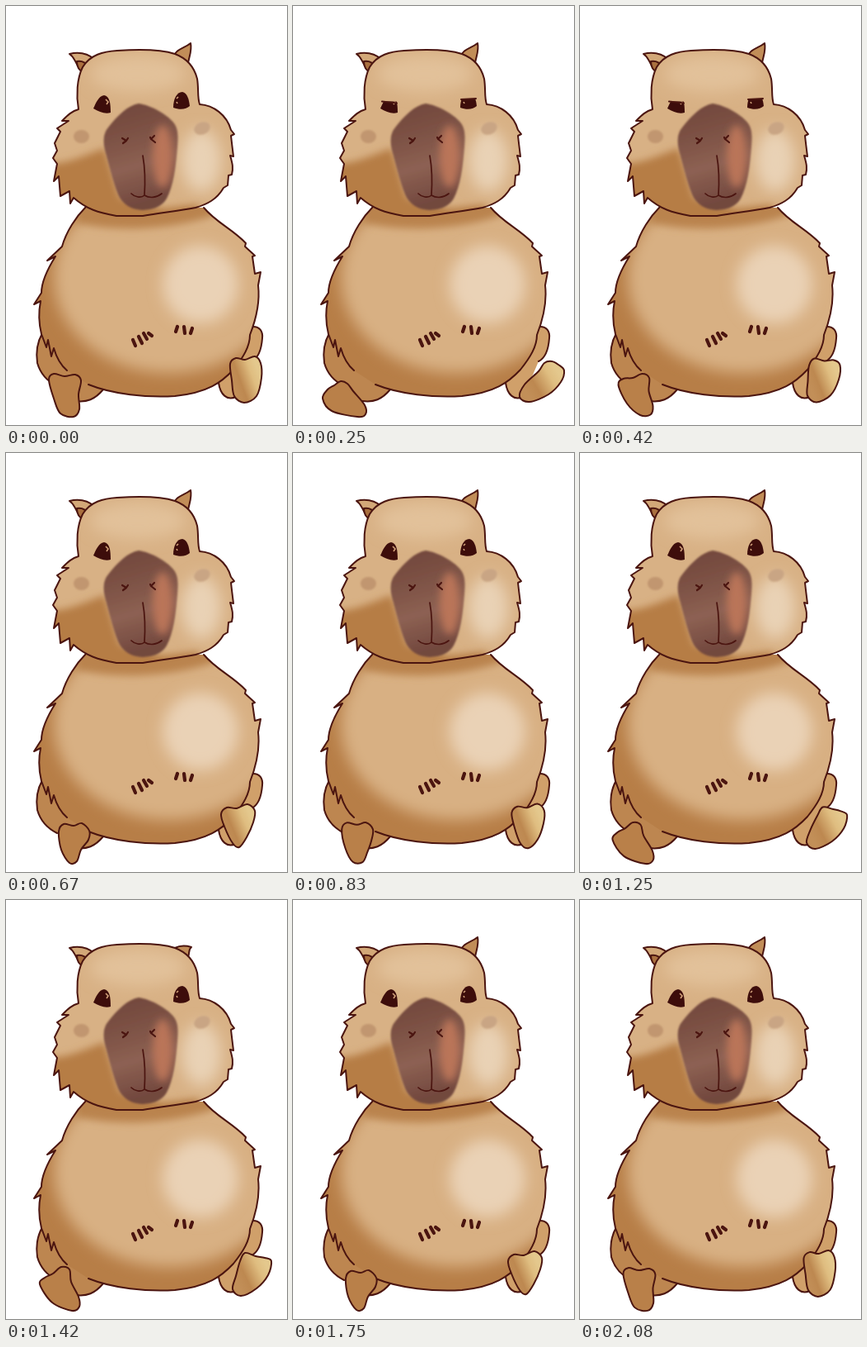
Recreate the animation shown at these times as an HTML page. Size 341x507 px, loop 2.12 s.

```html
<!DOCTYPE html>
<html lang="en">
<head>
<meta charset="utf-8">
<title>Sitting capybara</title>
<style>
  html, body { margin: 0; width: 100%; height: 100%; overflow: hidden; background: #fff; }
  svg { display: block; width: 100vw; height: 100vh; }
  .line { fill: none; stroke: #4b1510; stroke-width: 2; stroke-linejoin: round; stroke-linecap: round; }
  .ink { fill: #3d0d0b; }
</style>
</head>
<body>
<svg viewBox="0 0 341 507">
  <defs>
    <filter id="soft" x="-50%" y="-50%" width="200%" height="200%"><feGaussianBlur stdDeviation="9"/></filter>
    <filter id="faint" x="-50%" y="-50%" width="200%" height="200%"><feGaussianBlur stdDeviation="5"/></filter>
    <filter id="edge"><feGaussianBlur stdDeviation="0.8"/></filter>
    <linearGradient id="toe" x1="0.1" y1="0.65" x2="0.85" y2="0.25">
      <stop offset="0" stop-color="#c28f58"/><stop offset=".3" stop-color="#bd8850"/>
      <stop offset=".75" stop-color="#dfbd80"/><stop offset="1" stop-color="#e4c88d"/>
    </linearGradient>
    <linearGradient id="snout" x1="0" y1="0" x2="0.2" y2="1">
      <stop offset="0" stop-color="#70463b"/><stop offset=".35" stop-color="#7d5245"/>
      <stop offset=".65" stop-color="#8d6153"/><stop offset="1" stop-color="#72483e"/>
    </linearGradient>
    <path id="bodyShape" d="M97 243C85 255 73 273 68 291L50 308L60 303C48 322 43 338 43 347L34 361L42 357C39 372 40 385 43 397L49 413L51 404L55 424L58 414C62 428 68 436 74 441L100 458C130 470 170 474 205 472C245 468 262 455 276 440C288 425 296 412 296 398C305 375 308 355 306 338L309 322L302 324L299 303L302 302L290 291L291 287C275 270 255 262 240 244Z"/>
    <path id="headShape" d="M88 125C85 108 86 88 93 74C102 59 118 55 135 54C165 52 190 53 205 58C221 64 229 76 232 88C234 100 232 110 235 119C252 120 268 132 273 150L277 155L273 157C274 166 275 174 276 182L272 181C275 191 276 196 274 204L270 205L269 217L264 220C256 234 244 240 230 244C208 248 190 250 166 254L134 254C112 250 98 246 82 232L78 239L77 224L66 230L64 206L58 212L62 191L57 184L62 175L59 166L66 152L62 148L76 139L68 139C75 132 80 127 88 125Z"/>
    <path id="noseShape" d="M161 118C176 120 197 132 204 142C209 149 209 157 208 170C206 195 203 218 195 233C189 244 175 247 165 247C150 246 141 239 136 228C129 210 125 192 121 178C117 164 118 154 124 147C135 133 148 120 161 118Z"/>
    <clipPath id="bodyClip"><use href="#bodyShape"/></clipPath>
    <clipPath id="headClip"><use href="#headShape"/></clipPath>
    <clipPath id="noseClip"><use href="#noseShape"/></clipPath>
    <clipPath id="leftOpen"><rect id="leftLid" x="100" width="34" height="40"/></clipPath>
    <clipPath id="rightOpen"><rect id="rightLid" x="196" width="34" height="40"/></clipPath>
  </defs>

  <!-- legs -->
  <path fill="#bd8650" d="M44 396C36 410 37 425 38 432C42 446 50 454 62 460L84 478C98 480 108 476 118 464L120 430L60 400Z"/>
  <path class="line" d="M44 396C36 410 37 425 38 432C42 446 50 454 62 460M84 478C98 480 108 476 118 464"/>
  <path fill="#d0a06a" d="M298 388C308 387 312 394 311 402C310 416 306 426 298 430L280 472C268 478 260 470 258 456Z"/>
  <path class="line" stroke-width="1.5" d="M298 388C308 387 312 394 311 402C310 416 306 426 298 430M258 456C260 470 268 478 279 473"/>

  <!-- body -->
  <use href="#bodyShape" fill="#b77e47"/>
  <g clip-path="url(#bodyClip)">
    <ellipse cx="198" cy="328" rx="140" ry="116" fill="#d8b083" filter="url(#soft)"/>
    <ellipse cx="236" cy="337" rx="46" ry="47" fill="#ead2b6" filter="url(#soft)"/>
    <path d="M85 236H255V252C215 268 140 276 85 262Z" fill="#ba834d" filter="url(#faint)"/>
  </g>
  <path class="line" d="M97 243C85 255 73 273 68 291L50 308L60 303C48 322 43 338 43 347L34 361L42 357C39 372 40 385 43 397L49 413L51 404L55 424L58 414C62 428 68 436 74 441M100 458C130 470 170 474 205 472C245 468 262 455 276 440C288 425 296 412 296 398C305 375 308 355 306 338L309 322L302 324L299 303L302 302L290 291L291 287C275 270 255 262 240 244"/>
  <path class="line" style="stroke-width:4.2" d="M154 404L157 411M161 400L165 408M167 396L171 403M173 396L177 399M208 388L206 394M216 388L217 396M226 390L224 396"/>

  <!-- ears -->
  <path fill="#d3a878" class="line" style="fill:#d3a878" d="M108 65C100 58 90 55 77 58C83 62 83 66 87 72L95 80"/>
  <path class="line" style="fill:#aa703f" d="M86 67C93 66 97 69 99 73L94 80C88 78 86 73 86 67Z"/>
  <path id="ear" class="line" style="fill:#c18d58"/>

  <!-- head -->
  <use href="#headShape" fill="#d8b185"/>
  <g clip-path="url(#headClip)">
    <ellipse cx="160" cy="82" rx="58" ry="22" fill="#e2c19a" filter="url(#soft)"/>
    <path d="M40 190C70 195 95 180 120 172L138 232L190 245L235 240L230 268H60Z" fill="#b67d45" filter="url(#faint)"/>
    <ellipse cx="237" cy="187" rx="24" ry="38" fill="#e9d2b5" filter="url(#soft)"/>
  </g>
  <use href="#headShape" class="line"/>
  <g filter="url(#edge)">
    <ellipse cx="91.5" cy="158" rx="9.5" ry="8" fill="#c1966f"/>
    <ellipse cx="238" cy="148" rx="10" ry="7.5" fill="#c9a584" transform="rotate(-20 238 148)"/>
  </g>

  <!-- snout -->
  <use href="#noseShape" fill="url(#snout)" filter="url(#edge)"/>
  <g clip-path="url(#noseClip)">
    <ellipse cx="190" cy="182" rx="12" ry="38" fill="#ba7459" filter="url(#faint)"/>
  </g>
  <path class="line" d="M141 160L146 163L142 166M146 163L148 160M180 157L176 161L181 165M176 161L175 159" style="stroke-width:2.2"/>
  <path class="line" style="stroke-width:1.7" d="M166 181C169 198 169 214 168 229C164 233 156 231 152 227M168 229C174 233 183 232 189 227"/>

  <!-- eyes -->
  <g clip-path="url(#leftOpen)">
    <path class="ink" d="M106 124C109 118 112 109 119 108C126 109 127 118 127 129C120 131 113 128 106 124Z"/>
    <path d="M121 113L124 116L122 119" fill="none" stroke="#d3a27b" stroke-width="1.6"/>
  </g>
  <g clip-path="url(#rightOpen)">
    <path class="ink" d="M203 123C203 113 207 104 214 104C220 105 222 113 223 121C219 125 211 126 203 123Z"/>
    <path d="M207 112L209 110M207 116L208 118" fill="none" stroke="#d3a27b" stroke-width="1.6"/>
  </g>
  <path id="lids" class="line"/>

  <!-- feet -->
  <path id="leftFoot" class="line" style="fill:#b98049"/>
  <path id="rightFoot" class="line" style="fill:url(#toe)"/>
</svg>
<script>
const $ = id => document.getElementById(id);
const LOOP = 2120;

// Outline points for each pose: turned in, upright, leaning out, fully out.
const parse = rows => rows.map(row => row.split(' ').map(p => p.split(',').map(Number)));
const leftPoses = parse([
  '64,458 70,449 82,451 92,448 101,457 100,468 91,480 86,494 77,496 67,480',
  '52,452 58,445 71,448 84,446 91,453 88,470 89,488 82,497 66,493 58,475',
  '41,465 47,457 57,452 67,444 77,447 79,462 88,480 89,492 80,497 56,487',
  '36,475 42,464 50,459 58,454 66,457 73,466 87,483 88,494 78,497 47,490'
]);
const rightPoses = parse([
  '261,437 268,429 280,430 293,425 302,433 300,447 292,465 283,477 275,472 265,452',
  '272,433 279,426 290,428 302,424 309,432 310,450 304,472 289,480 277,472 274,453',
  '284,437 290,427 303,431 314,433 322,437 318,454 304,470 285,479 275,471 279,455',
  '298,442 305,432 314,430 322,434 329,441 325,455 310,470 287,479 275,473 281,458'
]);

// Pose position at each step of one foot swing.
const swing = [1, 1.5, 2.3, 3, 2, 1.5, 1, .4, 0, .15, .4, .7, .96];
// Lid position by step: 0 open, 1 shut.
const blink = { 2: .25, 3: .5, 4: 1, 5: .5 };

const mix = (a, b, f) => a + (b - a) * f;

function smoothLoop(pts) {
  const n = pts.length, at = i => pts[(i + n) % n];
  let d = 'M' + pts[0];
  for (let i = 0; i < n; i++) {
    const [a, b, c, e] = [at(i - 1), at(i), at(i + 1), at(i + 2)];
    const out = b.map((v, j) => v + (c[j] - a[j]) / 6);
    const into = c.map((v, j) => v - (e[j] - b[j]) / 6);
    d += `C${out} ${into} ${c}`;
  }
  return d + 'Z';
}

function footPath(poses, q) {
  const i = Math.min(Math.floor(q), poses.length - 2);
  return smoothLoop(poses[i].map((p, k) => p.map((v, j) => mix(v, poses[i + 1][k][j], q - i))));
}

// Twelve steps a second, with times rounded down to 10 ms.
function stepAt(t) {
  const r = t % 250;
  return 3 * Math.floor(t / 250) + (r >= 160 ? 2 : r >= 80 ? 1 : 0);
}

function draw(t) {
  const step = stepAt(t), q = swing[step % swing.length];
  $('leftFoot').setAttribute('d', footPath(leftPoses, q));
  $('rightFoot').setAttribute('d', footPath(rightPoses, q));

  const shut = blink[step] || 0;
  const left = mix(106, 125, shut), right = mix(102, 122, shut);
  $('leftLid').setAttribute('y', left);
  $('rightLid').setAttribute('y', right);
  $('lids').setAttribute('d', shut ? `M108 ${left}L126 ${left + 2}M204 ${right + 1}L222 ${right}` : '');

  const folded = step >= 16 && step <= 18;
  $('ear').setAttribute('d', folded
    ? 'M205 58C211 55 218 55 225 57C221 60 223 64 221 69'
    : 'M205 58C209 51 217 51 224 45C226 54 222 62 221 69');
}

function tick(now) {
  draw(now % LOOP);
  requestAnimationFrame(tick);
}
draw(0);
requestAnimationFrame(tick);
</script>
</body>
</html>
```
